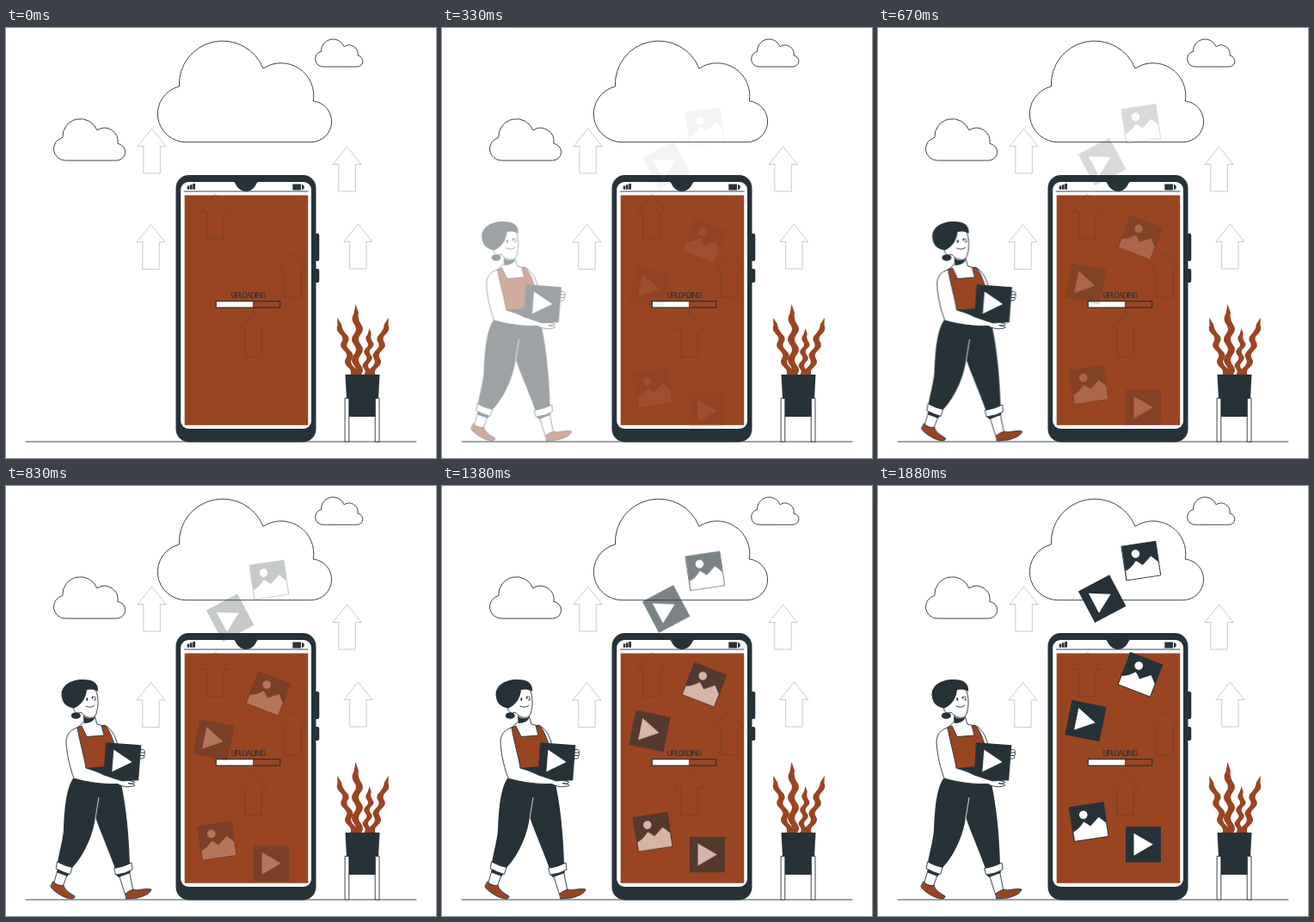
These frames come from a looping animation (500x500 px, 1930 ms). An HTML page without scripts:

```html
<!DOCTYPE html>
<html lang="en">
<head>
<meta charset="utf-8">
<title>Uploading</title>
<style>
  html, body { margin: 0; width: 100%; height: 100%; overflow: hidden; background: #fff; }
  svg { display: block; width: 100%; height: 100%; }
  .ink { fill: #263238; }
  .rust { fill: #994522; }
  .paper { fill: #fff; }
  .line { stroke: #263238; stroke-width: .9; stroke-linejoin: round; stroke-linecap: round; }
  .open { fill: none; }
  .arrows { fill: none; stroke: #263238; stroke-opacity: .28; stroke-width: .9; }
  .label { font: 9px Roboto, "Liberation Sans", sans-serif; letter-spacing: -1.05px; text-anchor: middle; }
  .walker { animation: walk 1930ms infinite; }
  .files { animation: rise 1930ms infinite; }

  @keyframes walk {
    0%, 6.73% { opacity: 0; transform: translateX(-27.2px); }
    6.735% {
      opacity: .092; transform: translateX(-27.2px);
      animation-timing-function: cubic-bezier(.303, .333, .501, 1.35);
    }
    50.26%, 100% { opacity: 1; transform: translateX(0); }
  }
  @keyframes rise {
    0%, 6.73% { opacity: 0; transform: translateY(29.6px); }
    6.735% {
      opacity: .012; transform: translateY(29.6px);
      animation-timing-function: cubic-bezier(.447, .115, 1, 1);
    }
    97.41%, 100% { opacity: 1; transform: translateY(0); }
  }
</style>
</head>
<body>
<svg viewBox="0 0 500 500" xmlns="http://www.w3.org/2000/svg">
  <defs>
    <path id="cloud" vector-effect="non-scaling-stroke" d="M209 132.7A32.8 32.8 0 0 1 201.5 68A50.5 50 0 0 1 299 47A38 38 0 0 1 357.3 85A23.92 23.92 0 0 1 355 132.7Z"/>
    <path id="arrow" d="M0 0L16.5 20.5H9.7V52H-9.7V20.5H-16.5Z"/>
    <path id="leaf" d="M-4 0Q1 -6 -4 -12T-4 -24T-4 -36T-4 -48T-4 -60Q-8 -66 -4 -72L-2 -83L1.500 -73Q0 -67 4 -60Q9 -54 4 -48T4 -36T4 -24T4 -12T4 0Z"/>
    <g id="video">
      <path class="ink" d="M-20.5 -20.5H20.5V20.7H-20.5Z"/>
      <path class="paper" d="M-11 -13L11.3 0L-11 13Z"/>
    </g>
    <g id="photo">
      <path class="ink line" d="M-20 -20H20V20H-20Z"/>
      <circle class="paper" cx="-5.3" cy="-9" r="4.8"/>
      <path class="paper" d="M-19.5 9Q-13 7 -6 -1Q-3 1 1 5.200L12 -3.800L19.5 4V19.5H-19.5Z"/>
    </g>
  </defs>

  <path class="line open" d="M23 481H477"/>

  <g class="line open">
    <use href="#cloud"/>
    <use href="#cloud" transform="translate(-17 99.5) scale(.411)"/>
    <use href="#cloud" transform="translate(311.5 8.8) scale(.273)"/>
  </g>

  <g id="phone">
    <rect class="ink" x="357" y="239" width="7.3" height="32" rx="2"/>
    <rect class="ink" x="357" y="280" width="7.3" height="16" rx="2"/>
    <rect class="ink" x="197.5" y="171" width="163" height="310.5" rx="15"/>
    <rect class="paper" x="203.2" y="179" width="151.8" height="287" rx="9"/>
    <path class="ink" d="M263.5 178.5C267 179 267 183 270 186Q274 190 279 190T288 186C291 183 291 179 294.500 178.500Z"/>
    <path class="line open" d="M207.5 190H351"/>
    <path class="ink" d="M210.7 183.5H213.4V187.8H210.7ZM214 182.2H216.6V187.8H214ZM217.2 181H220V187.8H217.2Z"/>
    <path class="ink" d="M333.3 181.5H343V188.5H333.3ZM344 181.5Q347 183 347 185T344 188.5Z"/>
    <rect class="rust" x="207.7" y="194.5" width="143.500" height="267.3"/>
    <text class="label ink" x="281.4" y="313.8">UPLOADING</text>
    <rect class="paper" x="244.3" y="317.6" width="42.600" height="7.6"/>
    <rect class="line open" x="244.2" y="317.6" width="74.5" height="7.6" style="stroke-width:1.2"/>
  </g>

  <g class="arrows">
    <use href="#arrow" x="169.6" y="117"/>
    <use href="#arrow" x="168.5" y="228.5"/>
    <use href="#arrow" x="396.6" y="138"/>
    <use href="#arrow" x="409.4" y="228"/>
    <use href="#arrow" x="243.6" y="193"/>
    <use href="#arrow" x="333.6" y="261"/>
    <use href="#arrow" x="287.6" y="330.5"/>
  </g>

  <g id="plant">
    <g class="rust">
      <use href="#leaf" transform="matrix(.9 0 .2 .81 403.500 404)"/>
      <use href="#leaf" transform="translate(408.5 404)"/>
      <use href="#leaf" transform="matrix(.8 0 -.07 .66 418.5 404)"/>
      <use href="#leaf" transform="matrix(-.9 0 -.2 .81 426.500 404)"/>
    </g>
    <path class="ink" d="M394.5 403H434.5L433 431H430V452H399V431H396Z"/>
    <path class="paper line" d="M394.5 430.5H398.800V481H394.5ZM429.6 430.5H434V481H429.6Z"/>
  </g>

  <g class="walker">
    <!-- legs and shoes -->
    <path class="paper line" d="M59 445L70 450L64 466L54 462ZM129 450L141 446L146 471L137 475Z"/>
    <path class="rust line" d="M53 460C57 465 62 465 65 464C66 470 73 474 78 477C78 481 73 480 69 479C62 477 52 470 50 466Z"/>
    <path class="rust line" d="M137 474C142 470 147 468 150 470C156 469 163 468 167 469C166 474 158 477 151 479L138 480Z"/>
    <path class="ink" d="M58 445L72 450L69.500 454L57.500 449.500ZM126 452L143 447L142.500 450L129 455Z"/>
    <path class="ink" d="M76 340L132 346C138 375 141 405 142 440L125 445C118 425 108 403 102 385C100 402 91 427 75 444L58 438C60 425 64 413 65 400C66 375 68 352 76 340Z"/>
    <path class="open" stroke="#fff" stroke-width=".8" d="M106 362Q104 374 102 386"/>
    <path class="paper line" d="M58 437Q66 442 75 443.500L72.500 451.500Q64 449 56.500 445ZM124 444.500Q135 443 144 438L145 446Q137 451 126 452Z"/>

    <!-- shirt, overalls -->
    <path class="paper line" d="M112 278C120 281 125 290 128 301L114 304Z"/>
    <path class="paper line" d="M82 280L89 274L89 266L101 267L104 277L112 279L114 294L90 296Z"/>
    <path class="ink" d="M88 268Q95 272 102 268.500Q99 276 89 276Z"/>
    <path class="rust line" d="M81 281L86 279L92 291.500L112 290L109 278.500L114 279C119 285 121 292 124 300L114 300L113 329L90 329C88 315 84 305 80 290Z"/>

    <!-- carried file and arms -->
    <path class="ink" d="M90 328L114 326L152 342L133 344Z"/>
    <path class="paper line" d="M152 307L158 306.500Q160.500 308 159 310Q161 312 158.500 313.500Q160 316 157 317L151 317Z"/>
    <path class="line open" d="M154 310H159M154 313.500H158.500"/>
    <use href="#video" transform="translate(133.300 320.200) rotate(4.500)"/>
    <path class="paper line" d="M81 281C73 283 68 289 68 298C69 315 73 329 77 340C94 345 112 347 128 346.500C134 350.500 144 350.500 148 348C147 346 143 347 140 345.500Q147 347 147.500 344Q142 341.500 133 343L112 336C104 332 98 330 91 328C89 314 84 299 81 281Z"/>

    <!-- head -->
    <ellipse class="ink" cx="79.300" cy="267" rx="5.500" ry="3.800"/>
    <path class="paper line" d="M90 236C97 233 103 236 104 242C105.500 249 105.500 256 103.500 263C102 269 98 270 94 269C90 268 87 266 85 263C80 266 75 261 77 257Z"/>
    <path class="ink" d="M63 246C60 232 74 224.500 88 225C99 225 106 229 105 239C101 236 97 236 92 237C91 246 87 254 77 258.500C68 257 64 252 63 246Z"/>
    <ellipse class="ink" cx="92.300" cy="248" rx="1" ry="1.900"/>
    <ellipse class="ink" cx="98.800" cy="246" rx=".9" ry="1.700"/>
    <path class="line open" d="M101 244.500L102.500 248.500L100.500 249M91 256Q97 259 101 255"/>
  </g>

  <g class="files">
    <use href="#photo" transform="translate(306 87) rotate(-8.500)"/>
    <use href="#video" transform="translate(260.600 131) rotate(-28)"/>
    <use href="#photo" transform="translate(305 219.300) rotate(21)"/>
    <use href="#video" transform="translate(241.500 273) rotate(11.500)"/>
    <use href="#photo" transform="translate(245.300 390.500) rotate(-8.500)"/>
    <use href="#video" transform="translate(308.500 416.800)"/>
  </g>
</svg>
</body>
</html>
```
